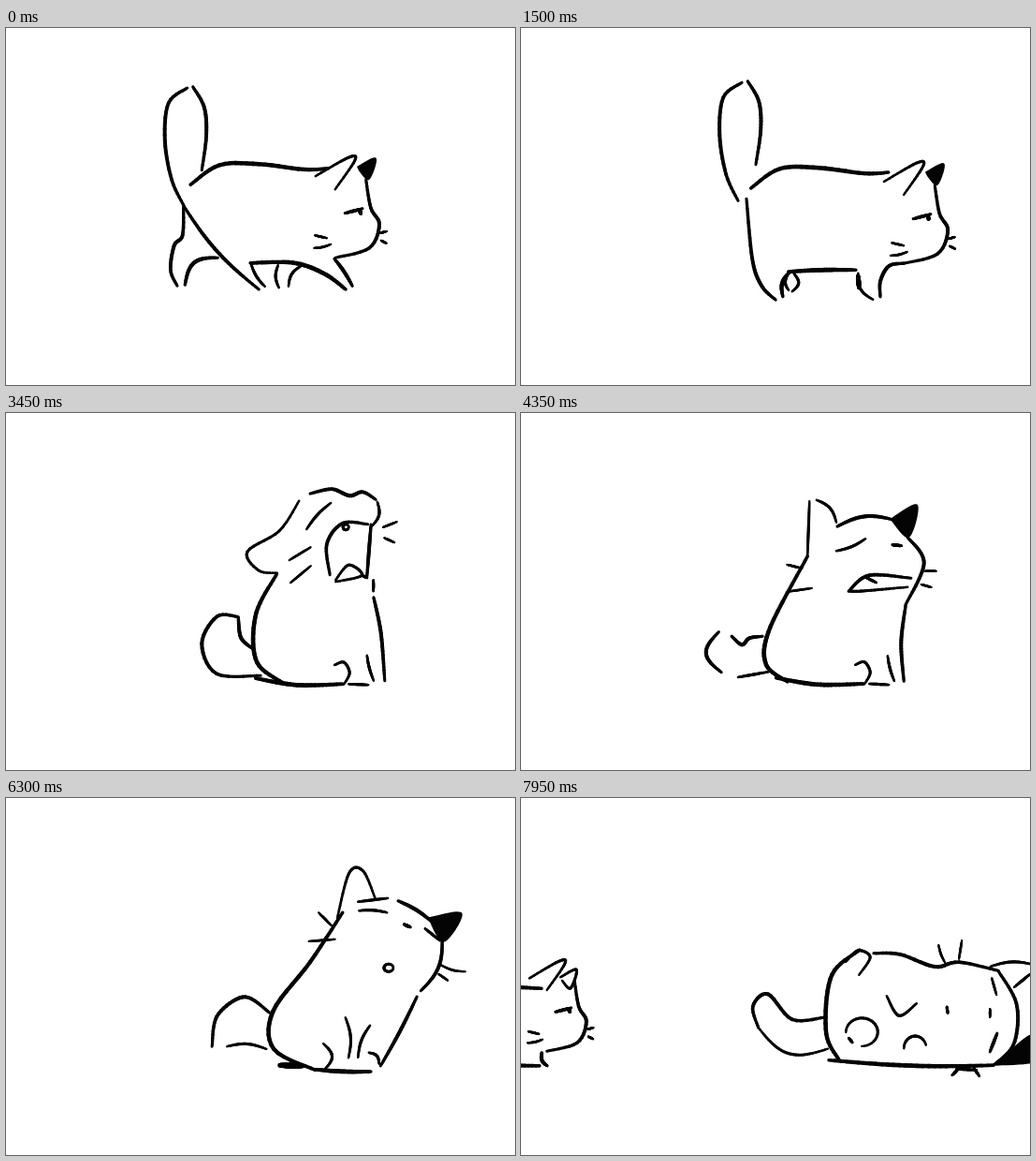
Animation of 544 by 381 pixels, one loop 8000 ms. Source, as an HTML page with a canvas:

```html
<!DOCTYPE html>
<html lang="en">
<head>
<meta charset="utf-8">
<title>Sleepy cat</title>
<style>
html, body { margin: 0; width: 100%; height: 100%; overflow: hidden; background: #fff; }
canvas { display: block; }
</style>
</head>
<body>
<canvas id="stage" width="544" height="381"></canvas>
<script>
const ctx = document.getElementById('stage').getContext('2d');
const INK = '#040404', LOOP = 8000, STEP = 150, SAMPLES = 28;

const mix = (a, b, u) => a + (b - a) * u;
const sample = f => Array.from({ length: SAMPLES + 1 }, (_, i) => f(i / SAMPLES));

// A line from one point to another that bulges by b to its left
function bow(x1, y1, x2, y2, b = 0) {
  const dx = x2 - x1, dy = y2 - y1, k = b / Math.hypot(dx, dy);
  return sample(u => {
    const lift = k * Math.sin(Math.PI * u);
    return [x1 + dx * u + dy * lift, y1 + dy * u - dx * lift];
  });
}

// Part of an ellipse, angles in degrees
function arc(cx, cy, rx, ry, from, to) {
  return sample(u => {
    const a = mix(from, to, u) * Math.PI / 180;
    return [cx + rx * Math.cos(a), cy + ry * Math.sin(a)];
  });
}

// Catmull-Rom curve through a few key points
function curve(...list) {
  const n = list.length / 2;
  const at = (i, k) => list[2 * Math.max(0, Math.min(n - 1, i)) + k];
  return sample(v => {
    const p = v * (n - 1), i = Math.min(n - 2, Math.floor(p)), u = p - i;
    return [0, 1].map(k => {
      const [a, b, c, d] = [-1, 0, 1, 2].map(j => at(i + j, k));
      return b + u / 2 * (c - a + u * (2 * a - 5 * b + 4 * c - d + u * (3 * (b - c) + d - a)));
    });
  });
}

function move(parts, dx, dy, scale = 1) {
  const out = {};
  for (const name in parts)
    out[name] = parts[name].map(([x, y]) => [x * scale + dx, y * scale + dy]);
  return out;
}

// Groups shared by several poses
const head = {
  ear: curve(331,158, 366,138, 373,141, 352,172),
  face: curve(385,162, 390,192, 399,210, 388,235, 352,245),
  eye: bow(362,198, 381,193),
  pupil: bow(378,195, 379,198),
  whisk1: bow(400,219, 407,217),
  whisk2: bow(401,227, 407,230)
};
const darkEar = { dark: curve(376,148, 395,139, 388,161, 378,152) };
const cheeks = { cheek1: bow(330,221, 343,224), cheek2: bow(329,235, 347,231, -1) };
const raisedTail = {
  tail: curve(194,64, 174,80, 170,120, 177,162, 190,190),
  tailIn: curve(200,63, 212,85, 214,115, 209,152)
};
const spine = { back: curve(197,167, 228,146, 270,145, 318,151, 344,150) };
const seat = {
  belly: curve(271,284, 315,291, 365,290),
  leg: bow(390,260, 397,287, -1),
  paw: curve(355,270, 365,267, 371,278, 366,289),
  sole: bow(370,290, 391,291)
};

const walk = {
  ...head, ...darkEar, ...cheeks, ...raisedTail, ...spine,
  hind: curve(190,190, 189,221, 180,232, 176,258, 183,275),
  haunch: bow(190,190, 270,279, -6),
  hindIn: bow(191,274, 226,245, 12),
  belly: curve(261,251, 308,251, 341,263, 363,279),
  step1: bow(262,252, 277,276, -2),
  step2: bow(291,253, 292,277, -3),
  leg: bow(316,254, 302,276, -4),
  front: bow(351,246, 370,275, 1)
};
const stand = {
  ...move({ ...head, ...darkEar }, 57, 6), ...move(cheeks, 66, 8),
  ...move(raisedTail, 42, -6), ...move(spine, 49, 4),
  hind: curve(241,182, 247,247, 257,275, 272,290),
  hindIn: bow(280,287, 288,260, 5),
  belly: bow(286,260, 358,258, 1),
  step1: bow(292,262, 290,281, 6),
  step2: bow(285,264, 286,280, -3),
  heel: bow(360,264, 361,277),
  leg: bow(360,262, 376,290, -6),
  front: curve(409,251, 393,254, 384,270, 384,287)
};
const sit = {
  ...seat,
  tail: curve(228,188, 207,192, 196,222, 218,263, 272,279),
  tailIn: curve(238,200, 243,232, 262,242),
  back: curve(290,288, 266,264, 270,222, 315,162, 349,137),
  ear: bow(338,148, 381,110),
  earIn: bow(386,111, 375,148, 6),
  dark: curve(388,137, 427,122, 416,153, 388,137),
  face: curve(415,152, 419,178, 429,203, 420,220, 398,229),
  eye: bow(381,187, 406,178, -1),
  cheek1: bow(366,207, 380,208),
  cheek2: bow(363,230, 381,220),
  whisk1: bow(429,203, 443,203),
  whisk2: bow(431,213, 437,219),
  front: curve(406,229, 402,250, 408,287),
  toe: curve(365,274, 380,289, 364,287)
};
const yawn = {
  ...move(seat, -4, -1),
  tail: curve(247,217, 225,217, 209,246, 225,278, 272,280),
  tailIn: curve(248,218, 251,240, 264,252),
  back: curve(298,289, 268,265, 267,215, 289,172),
  ear: bow(321,124, 347,96, 2),
  nape: curve(313,94, 292,126, 258,148, 270,168, 290,171),
  head: curve(325,86, 348,81, 367,88, 381,84, 395,92),
  snout: bow(397,95, 391,121, 5),
  face: bow(390,119, 386,175),
  mouth: curve(346,173, 343,140, 360,118, 387,119),
  tongue: curve(352,178, 366,162, 380,173, 352,180),
  lip: bow(380,173, 386,176),
  nose: arc(363,122, 3,3, 0,360),
  cheek1: bow(303,157, 326,143),
  cheek2: bow(304,181, 326,163),
  whisk1: bow(403,122, 418,116),
  whisk2: bow(404,133, 415,138),
  chin: bow(393,178, 393,190),
  front: curve(393,197, 401,235, 405,286)
};
const grump = {
  ...move(seat, 2, -1),
  tail: bow(211,234, 214,277, -15),
  tailIn: curve(225,238, 236,247, 244,240, 258,238),
  tailLow: bow(232,282, 265,276),
  back: curve(285,287, 262,268, 266,230, 306,153),
  ear: bow(306,152, 308,94),
  earIn: bow(316,93, 337,117, 5),
  head: bow(338,121, 397,114, 7),
  dark: curve(395,113, 423,98, 414,132, 395,113),
  face: curve(413,132, 431,160, 411,205),
  brow: bow(337,147, 368,134, -2),
  eye: bow(397,141, 407,142),
  mouth: curve(350,190, 372,173, 417,176),
  lip: curve(350,190, 365,190, 413,186),
  tooth: bow(368,175, 380,181),
  cheek1: bow(284,162, 300,166),
  cheek2: bow(284,191, 311,187),
  whisk1: bow(432,169, 444,169),
  whisk2: bow(428,183, 439,186),
  front: curve(411,205, 406,245, 409,286)
};
const lean = {
  tail: curve(282,229, 255,212, 226,232, 220,265),
  tailLow: bow(236,265, 278,268, 4),
  back: curve(330,290, 286,268, 285,228, 325,175, 360,122),
  ear: curve(354,128, 367,80, 382,78, 395,108),
  brow: bow(376,111, 408,107),
  brow2: bow(377,120, 407,122, 1.5),
  head: bow(419,110, 456,133, 2),
  dark: curve(452,128, 487,123, 468,153, 452,128),
  earIn: bow(448,139, 464,152),
  face: bow(466,150, 443,206, 8),
  eye: bow(425,135, 432,138),
  nose: arc(409,181, 5,4, 0,360),
  cheek1: bow(334,122, 348,136),
  cheek2: bow(324,153, 352,151),
  whisk1: bow(465,178, 491,185, -2),
  whisk2: bow(462,188, 472,195),
  rump: bow(293,285, 317,286),
  belly: bow(330,290, 390,292, -1),
  leg: bow(363,234, 366,277, 4),
  leg2: bow(389,243, 376,277, -3),
  front: bow(439,212, 400,286, 1),
  paw: bow(339,262, 340,290, 9),
  paw2: bow(388,272, 399,284, 4)
};
const flop = {
  tail: curve(324,234, 290,236, 264,209, 248,222, 254,245),
  tailLow: bow(254,245, 328,268, -17),
  back: curve(340,280, 326,250, 332,190, 362,162),
  paw2: curve(347,175, 360,163, 373,170, 361,189),
  head: curve(377,166, 405,167, 442,180, 468,175, 510,184),
  face: curve(510,184, 530,220, 527,262, 505,285),
  belly: bow(329,280, 505,285, -3),
  whisk1: bow(446,157, 453,176, -1),
  whisk2: bow(471,152, 468,172),
  ear: bow(502,180, 549,178, 4),
  earIn: bow(544,188, 527,202),
  dark: curve(508,285, 546,253, 552,280, 508,285),
  foot1: bow(461,296, 468,289),
  foot2: bow(484,288, 490,297),
  sole: bow(465,289, 487,290),
  smile: curve(391,211, 404,232, 423,219),
  nose: bow(455,223, 456,230),
  paw: arc(364,250, 17,15, 180,450),
  pad: bow(350,256, 354,261),
  leg: arc(421,267, 12,13, 180,345),
  cheek1: bow(503,192, 508,210),
  cheek2: bow(501,225, 501,234),
  eye: bow(509,251, 501,271)
};
const friend = {
  ...move({ ...head, ...cheeks }, -289, 50, 0.9),
  ...move({ earIn: darkEar.dark }, -296, 58, 0.9),
  back: bow(-90,203, 22,203, 2),
  front: bow(22,272, 28,286, -3),
  belly: bow(-90,285, 20,286)
};

const WIDTH = { tail: 3.8, tailIn: 3.8, back: 4.4, belly: 4.5, head: 3.9, face: 3.7, hind: 3.8,
  haunch: 3.8, hindIn: 4, front: 3.8, heel: 5, rump: 6, pupil: 4, mouth: 3.6, eye: 3.4,
  cheek1: 2.6, cheek2: 2.6, whisk1: 2.5, whisk2: 2.5 };
const FILLED = { dark: true, toe: true };

// Start time, end time, pose before, pose after, easing power
const MOVES = [
  [900, 1500, walk, stand, 1],
  [1500, 2250, stand, sit, 1],
  [2550, 3150, sit, yawn, 1],
  [3750, 4350, yawn, grump, 1],
  [5550, 6300, grump, lean, 3],
  [6300, 7050, lean, flop, 1]
];

function blend(a, b, u) {
  const out = {};
  for (const name in { ...a, ...b }) {
    if (a[name] && b[name])
      out[name] = a[name].map((p, i) => p.map((v, k) => mix(v, b[name][i][k], u)));
    else if ((u < 0.5 ? a : b)[name]) out[name] = a[name] || b[name];
  }
  return out;
}

function poseAt(t) {
  const past = MOVES.filter(m => m[0] <= t);
  if (!past.length) return walk;
  const [from, to, a, b, power] = past[past.length - 1];
  return blend(a, b, Math.min(1, (t - from) / (to - from)) ** power);
}

function stroke(points, width) {
  for (let i = 1; i < points.length; i++) {
    ctx.lineWidth = width * (0.8 + 0.25 * Math.sin(Math.PI * i / SAMPLES));
    ctx.beginPath();
    ctx.moveTo(...points[i - 1]);
    ctx.lineTo(...points[i]);
    ctx.stroke();
  }
}

function fill(points) {
  ctx.beginPath();
  points.forEach(p => ctx.lineTo(...p));
  ctx.closePath();
  ctx.fill();
  ctx.lineWidth = 1.5;
  ctx.stroke();
}

// Each line wavers a little from drawing to drawing, as by hand
function drawCat(pose, dx, tick) {
  Object.keys(pose).forEach((name, k) => {
    const points = pose[name].map(([x, y]) => [
      x + dx + 0.3 * Math.sin(tick * 2.1 + k + y / 40),
      y + 0.3 * Math.sin(tick * 1.7 + k * 2 + x / 50)
    ]);
    if (FILLED[name]) fill(points);
    else stroke(points, WIDTH[name] || 3);
  });
}

function frame(now) {
  let tick = Math.floor(now % LOOP / STEP);
  if (tick > 3 && tick < 7) tick = 3;
  const t = tick * STEP;
  ctx.fillStyle = '#fff';
  ctx.fillRect(0, 0, 544, 381);
  ctx.fillStyle = ctx.strokeStyle = INK;
  ctx.lineCap = ctx.lineJoin = 'round';
  drawCat(poseAt(t), 0, tick);
  if (t >= 7050) drawCat(friend, (t - 7950) * 0.08, tick);
  requestAnimationFrame(frame);
}
requestAnimationFrame(frame);
</script>
</body>
</html>
```
